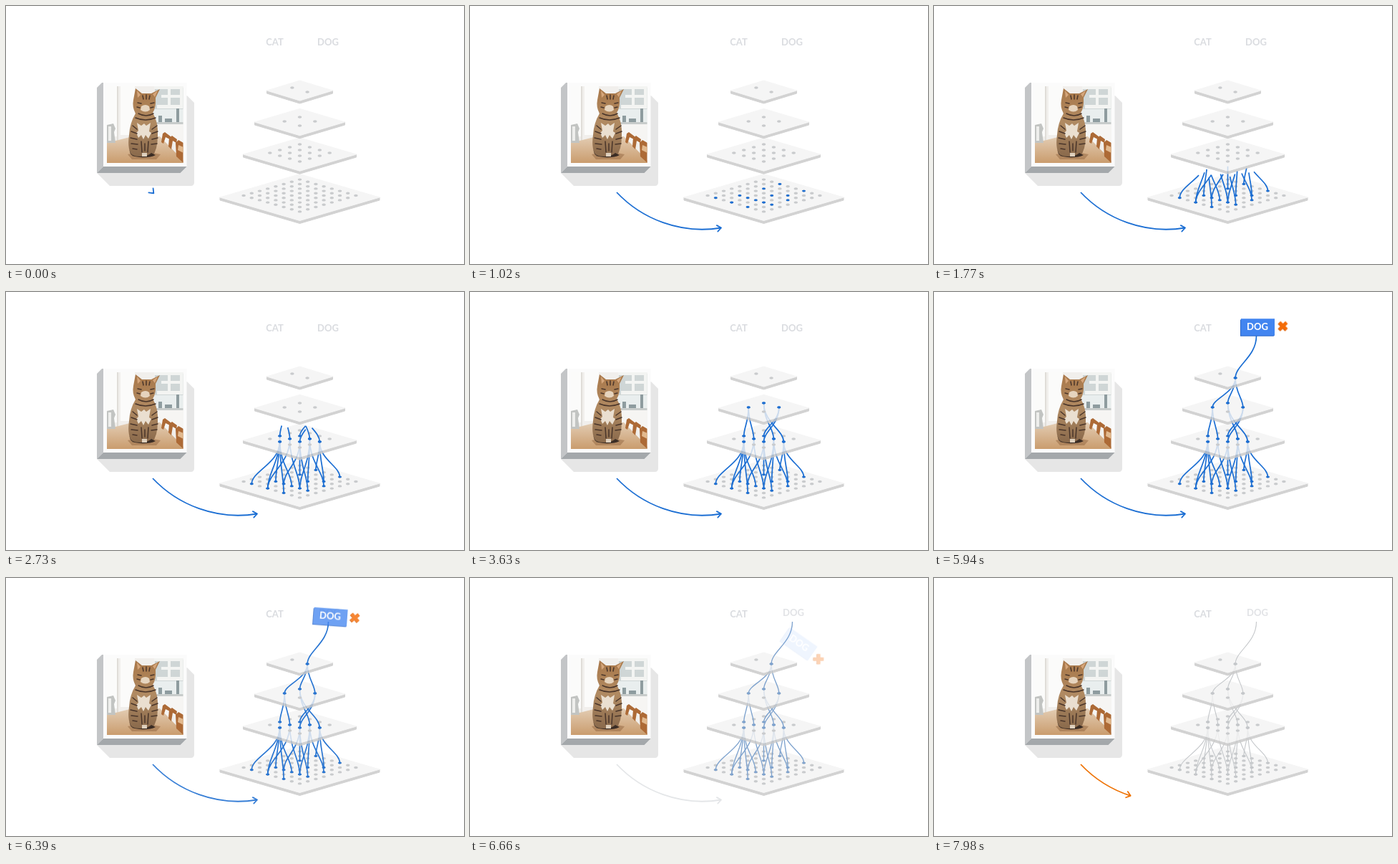
An HTML page that plays this animation: 640x360 px, repeating every 8000 ms.

```html
<!DOCTYPE html>
<html lang="en">
<head>
<meta charset="utf-8">
<title>Image classifier</title>
<style>
html, body { margin: 0; width: 100%; height: 100%; overflow: hidden; background: #fff; }
svg { display: block; width: 100%; height: 100%; }
text { font: 700 13px Lato, "Open Sans", sans-serif; text-anchor: middle; }

svg * { animation-duration: 8s; animation-iteration-count: infinite; animation-fill-mode: both; }
.line { fill: none; stroke-dasharray: 1 2; animation-timing-function: cubic-bezier(.37, 0, .63, 1); }
.plate { opacity: .82; }
.signal { animation-name: cool; animation-timing-function: linear; }
.lit ellipse { stroke: none; }
.lit { animation-timing-function: step-end; }

@keyframes cool {
  0%, 79.4% { fill: #1b6ed3; stroke: #1b6ed3; stroke-width: 1.7px; }
  85.9%, 100% { fill: #c4c7ca; stroke: #c4c7ca; stroke-width: 1.1px; }
}
.line.l0 { animation-name: grow0; }
.line.l1 { animation-name: grow1; }
.line.l2 { animation-name: grow2; }
.line.l3 { animation-name: grow3; }
@keyframes grow0 { 0%, 12.5% { stroke-dashoffset: 1; } 30%, 100% { stroke-dashoffset: 0; } }
@keyframes grow1 { 0%, 30% { stroke-dashoffset: 1; } 40%, 100% { stroke-dashoffset: 0; } }
@keyframes grow2 { 0%, 49.4% { stroke-dashoffset: 1; } 57.2%, 100% { stroke-dashoffset: 0; } }
@keyframes grow3 { 0%, 57% { stroke-dashoffset: 1; } 66.2%, 100% { stroke-dashoffset: 0; } }
.lit.l0 { animation-name: lit0; }
.lit.l1 { animation-name: lit1; }
.lit.l2 { animation-name: lit2; }
.lit.l3 { animation-name: lit3; }
@keyframes lit0 { 0% { opacity: 0; } 12.5%, 100% { opacity: 1; } }
@keyframes lit1 { 0% { opacity: 0; } 29%, 100% { opacity: 1; } }
@keyframes lit2 { 0% { opacity: 0; } 39%, 100% { opacity: 1; } }
@keyframes lit3 { 0% { opacity: 0; } 57%, 100% { opacity: 1; } }

.arrow { fill: none; stroke-width: 1.8; }
.head {
  offset-path: path("M205 260C240 297 294 319 351 309.5");
  offset-rotate: auto;
  stroke-linejoin: round;
  stroke-linecap: round;
}
.blue { animation-name: fade; animation-timing-function: linear; }
.blue .line { animation-name: drawBlue; }
.blue .head { animation-name: rideBlue; animation-timing-function: cubic-bezier(.37, 0, .63, 1); }
.orange { stroke: #ee7203; animation-name: show; animation-timing-function: step-end; }
.orange .line { animation-name: drawOrange; animation-timing-function: cubic-bezier(.364, 0, .68, .5); }
.orange .head { animation-name: rideOrange; animation-timing-function: cubic-bezier(.364, 0, .68, .5); }
@keyframes drawBlue { 0% { stroke-dashoffset: .988; } 11.9%, 100% { stroke-dashoffset: 0; } }
@keyframes rideBlue { 0% { offset-distance: 1.2%; } 11.9%, 100% { offset-distance: 100%; } }
@keyframes drawOrange { 0%, 93.5% { stroke-dashoffset: 1; } 100% { stroke-dashoffset: .45; } }
@keyframes rideOrange { 0%, 93.5% { offset-distance: 0%; } 100% { offset-distance: 55%; } }
@keyframes fade {
  0%, 79.4% { stroke: #1b6ed3; opacity: 1; }
  83%, 83.5% { stroke: #e4e6e8; opacity: 1; }
  86%, 100% { stroke: #e4e6e8; opacity: 0; }
}
@keyframes show { 0% { opacity: 0; } 94%, 100% { opacity: 1; } }

.label { fill: #dadce0; }
.dog { animation-name: lift; animation-timing-function: step-end; }
@keyframes lift { 0% { translate: 0 0; opacity: 1; } 67.5%, 100% { translate: 2px -2px; opacity: .8; } }

.badge, .cross { animation-timing-function: cubic-bezier(.33, 0, .67, .33), linear; }
.badge { animation-name: badge, badgeFade; }
.cross { animation-name: cross, crossFade; }
@keyframes badge {
  0%, 66.2% { scale: 0; translate: -2px 11px; animation-timing-function: ease-out; }
  68.7%, 78.1% { scale: 1; translate: 0 0; rotate: 0deg; }
  85.9%, 100% { scale: 1; translate: 16px 98px; rotate: 80deg; }
}
@keyframes badgeFade { 0%, 78.75% { opacity: 1; } 83.7%, 100% { opacity: 0; } }
@keyframes cross {
  0%, 70% { translate: -24px 0; rotate: -90deg; scale: 0; animation-timing-function: step-end; }
  70.1% { translate: -24px 0; rotate: -90deg; scale: 1; animation-timing-function: ease-out; }
  73.5%, 78.1% { translate: 0 0; rotate: 0deg; scale: 1; }
  85.9%, 100% { translate: -1px 151px; rotate: 103deg; scale: 1; }
}
@keyframes crossFade { 0%, 78.75% { opacity: 1; } 85.25%, 100% { opacity: 0; } }
</style>
</head>
<body>
<svg viewBox="0 0 640 360">
  <defs>
    <clipPath id="frame"><path d="M141 112h106.500v107H141z"/></clipPath>
    <linearGradient id="wood" x1="0" y1="0" x2="0" y2="1">
      <stop offset="0" stop-color="#e3cdb4"/><stop offset="1" stop-color="#c99b6c"/>
    </linearGradient>
    <linearGradient id="fur" x1="0" y1="0" x2="0" y2="1">
      <stop offset="0" stop-color="#a9784a"/><stop offset=".5" stop-color="#b08a62"/><stop offset="1" stop-color="#8a6a4c"/>
    </linearGradient>
  </defs>

  <!-- framed picture -->
  <path fill="#e6e6e6" d="M240 125h13l10 10v111q0 5-5 5H145l-18-18z"/>
  <path fill="#c3c5c7" d="M136 107h-2l-7 7v119l9-9z"/>
  <path fill="#a4a8ab" d="M127 233l9-9h116.500l-9 9z"/>
  <path fill="#fbfbfb" d="M136 107h116.500v117H136z"/>
  <g clip-path="url(#frame)">
    <path fill="#f1efec" d="M141 112h107v108H141z"/>
    <path fill="#fbfbfa" d="M141 112h14v70h-14zM160 112h20v68h-20z"/>
    <path fill="#e0ddd8" d="M155 112h2v76h-2z"/>
    <path fill="#cfd6d6" d="M208 114h40v30h-40z"/>
    <path fill="#f3f4f2" d="M207 112h41v4h-41zM217 124h31v4h-31zM211 138h37v5h-37zM226 114h4v28h-4zM243 114h5v28h-5z"/>
    <path fill="#e9eeee" d="M207 144h41v18h-41z"/>
    <path fill="#8e9c9f" d="M213 153h5v9h-5zM222 157h10v5h-10zM238 143h4v19h-4z"/>
    <path fill="#c8cccb" d="M208 162h40v3h-40z"/>
    <path fill="#f6f5f3" d="M208 165h40v26h-40z"/>
    <path fill="url(#wood)" d="M141 191l36-9h38l33 34v4H141z"/>
    <path fill="#c2c4c2" d="M141 166l9-2 3 7-2 5 2 15h-12z"/>
    <path fill="#eeeeec" d="M143 168h4v20h-4z"/>
    <g fill="#ad6a36">
      <path d="M219 178l3-2 8 6-1 4-6-3-3 9-3-2zM228 184l4-3 7 5-1 5-5-3-2 12-4-4zM237 191l4-4 7 4v28l-10-9z"/>
    </g>
    <path fill="#e2b98e" d="M241 194l7 3v8l-8-4z"/>
    <path fill="#8a5d38" opacity=".45" d="M170 207q22-6 46 0l-6 7h-34z"/>
    <path fill="url(#fur)" d="M181 115l9 7h13l12-6-6 12q1 14-4 21 8 13 7 32 0 20-8 29h-27q-8-9-5-30 1-17 9-30-5-9-3-19z"/>
    <path fill="#d6a77c" d="M183 118l5 6-4 4zM212 118l-7 5 3 4z"/>
    <path fill="#e6d4be" d="M189 140q6-4 11 0l1 5q-6 5-13 0z"/>
    <path fill="#eadfd0" d="M183 163l6 4 4-3 3 3 6-4-2 12 3 2-4 8-4-5-3 6-3-6-4 4-3-7 3-3z"/>
    <g fill="none" stroke="#49352a" stroke-width="1.500" stroke-linecap="round">
      <path d="M191 125l1 5M196 124v6M201 125l-1 5M184 135l5 1M207 135l-5 1M183 141l4 1M206 141l-4 1"/>
      <path d="M185 150q11 6 21 0M181 156q14 6 28 0M177 167l6 5M211 167l-7 5M175 175l8 3M212 175l-8 3M174 184l9 2M212 184l-8 2M175 192l9 1M211 192l-8 1M177 199l6 1M189 189l1 15M199 189l-1 15M194 192v10"/>
    </g>
    <path fill="#3a2c24" d="M173 200q-1 10 15 10 12-1 15-5l6 3q-8 4-22 3-16-1-14-11z"/>
    <path fill="#ded0bd" d="M190 205h7v5h-7z"/>
  </g>

  <g class="arrow blue"><path class="line" pathLength="1" d="M205 260C240 297 294 319 351 309.500"/><path class="head" d="M-5.500-4.300L0 0L-5.500 4.300"/></g>
  <g class="arrow orange"><path class="line" pathLength="1" d="M205 260C240 297 294 319 351 309.500"/><path class="head" d="M-5.500-4.300L0 0L-5.500 4.300"/></g>

  <text class="label" x="375.500" y="54.800">CAT</text>
  <text class="label dog" x="450" y="54.800">DOG</text>

  <g id="net"></g>

  <g transform="translate(487.700 47.500)"><g class="cross" fill="none" stroke-width="4.600">
    <path stroke="#c95503" d="M-5.700-4.300L4.300 5.700M-5.700 5.700L4.300-4.300"/>
    <path stroke="#f46c08" d="M-5-5L5 5M-5 5L5-5"/>
  </g></g>
  <g transform="translate(452 49.500)"><g class="badge">
    <path fill="#2a66c8" d="M-22.500-12l-1.500 1.500V12.200H22.500L24 11z"/>
    <path fill="#4285f0" d="M-23-12.200H24V11.200H-23z"/>
    <text fill="#fff" y="3.300">DOG</text>
  </g></g>
</svg>
<script>
const CX = 410.5;
// y: surface centre, w/h: half size, n: dots per side, dx/dy: dot spacing, dotY: dot grid centre
const plates = [
  { y: 267, w: 111.5, h: 32.5, n: 8, dx: 11.2, dy: 3.2, dotY: 264.5 },
  { y: 207, w: 79, h: 23.2, n: 4, dx: 13.9, dy: 4, dotY: 205 },
  { y: 162, w: 63, h: 18.7, n: 2, dx: 21.3, dy: 6, dotY: 161 },
  { y: 118, w: 46, h: 14, n: 0, dx: 10.6, dy: 3, dotY: 117 }
];
// each link: column, row on one plate, then column, row on the plate above
const links = [
  [[-6, 1, -2, 1], [-4, 3, -1, 0], [-2, 5, -2, 1], [-3, 0, -2, -1],
   [-2, 1, 0, 1], [-1, 2, -2, 1], [0, 3, -1, 0], [-4, 3, -2, -1],
   [0, -3, 0, -1], [1, 4, 0, 1], [1, 0, 1, 0], [0, 3, 1, 0],
   [3, 2, 1, 0], [3, 0, 2, 1], [2, -5, 2, 1], [5, -2, 2, 1]],
  [[-2, -1, -1, 0], [-1, 0, -1, 0], [0, -1, 1, 0], [1, 0, 0, -1], [2, 1, 0, -1], [0, 1, 1, 0]],
  [[-1, 0, 1, 1], [0, -1, 1, 1], [1, 0, 1, 1]]
];

const spot = (p, a, b) => [CX + a * p.dx, p.dotY + b * p.dy];
const dot = (p, [a, b], r) => {
  const [x, y] = spot(p, a, b);
  return `<ellipse cx="${x}" cy="${y}" rx="${r}" ry="${r * 0.6}"/>`;
};
const line = (k, [x0, y0], [x1, y1]) => {
  const rise = y0 - y1;
  return `<path class="line l${k}" pathLength="1" d="M${x0} ${y0}C${x0} ${y0 - rise * 0.3} ${x1} ${y1 + rise * 0.5} ${x1} ${y1}"/>`;
};

function gridDots({ n }) {
  if (!n) return [[-1, -1], [1, 1]];
  return Array.from({ length: n * n }, (_, k) => {
    const i = k % n, j = Math.floor(k / n);
    return [i - j, i + j - n + 1];
  });
}

function body({ y, w, h }) {
  const l = CX - w, r = CX + w;
  return `<g class="plate" stroke-width="1" stroke-linejoin="round">
    <path fill="#c9c9c9" stroke="#c9c9c9" d="M${l} ${y}L${CX} ${y + h}L${r} ${y}v4L${CX} ${y + h + 4}L${l} ${y + 4}z"/>
    <path fill="#f3f3f3" stroke="#f3f3f3" d="M${l} ${y}L${CX} ${y - h}L${r} ${y}L${CX} ${y + h}z"/></g>`;
}

document.getElementById('net').innerHTML = plates.map((p, k) => {
  const lit = k ? links[k - 1].map(l => l.slice(2)) : links[0].map(l => l.slice(0, 2));
  const up = k < 3
    ? links[k].map(([a, b, c, d]) => line(k, spot(p, a, b), spot(plates[k + 1], c, d)))
    : [line(k, spot(p, 1, 1), [450.5, 61])];
  return body(p) +
    `<g fill="#c9cbcd">${gridDots(p).map(d => dot(p, d, 2.8)).join('')}</g>
     <g class="signal"><g class="lit l${k}">${lit.map(d => dot(p, d, 2.4)).join('')}</g>${up.join('')}</g>`;
}).join('');
</script>
</body>
</html>
```
